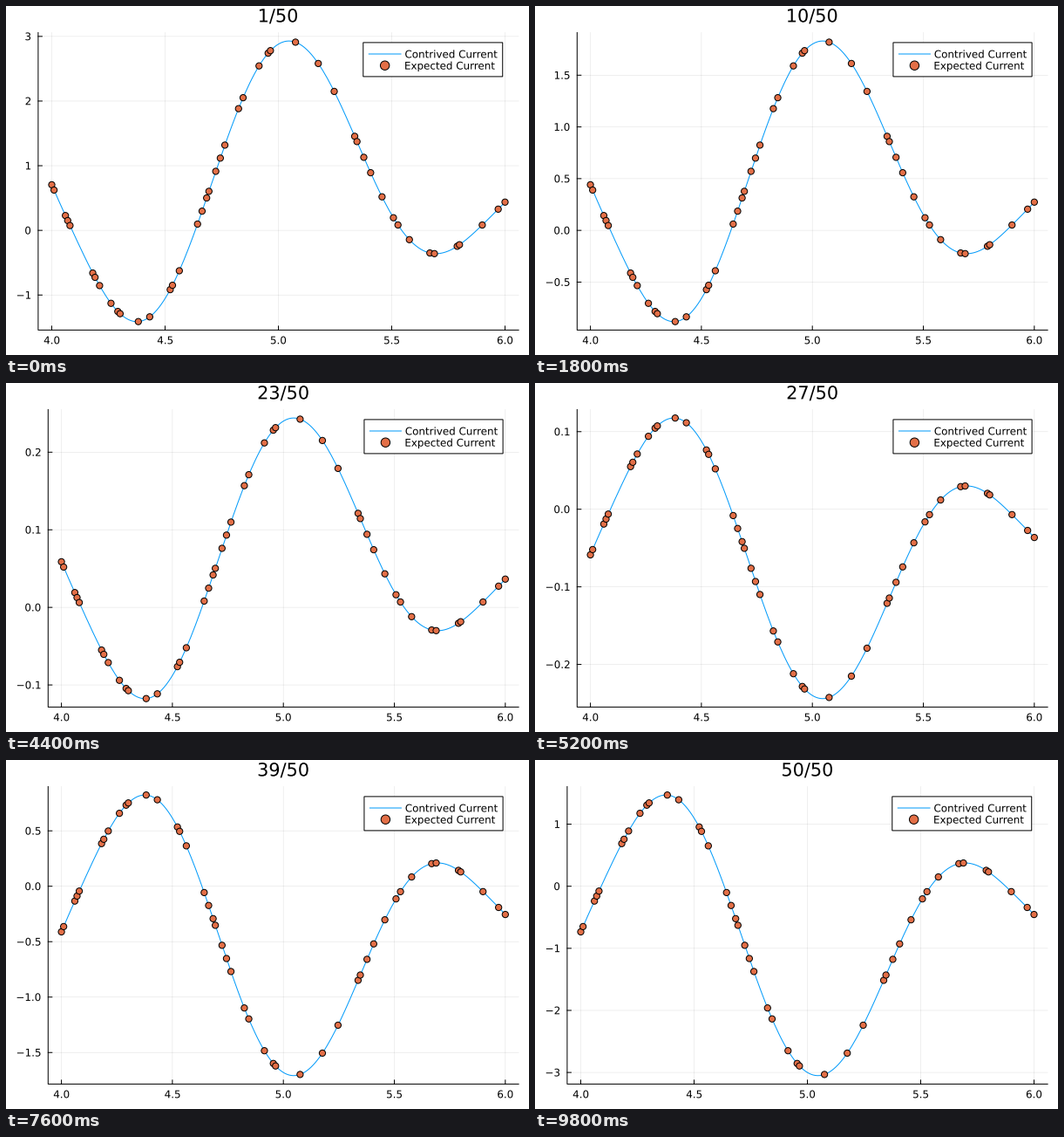
These frames come from a looping animation (600 px wide and 400 px high, 10000 ms). A matplotlib script:

```python
import math

import matplotlib.pyplot as plt
import numpy as np
from matplotlib.animation import FuncAnimation
from matplotlib.patches import Circle, PathPatch, Rectangle
from matplotlib.textpath import TextPath
from matplotlib.transforms import Affine2D

W, H, DPI = 600, 400, 100
FRAMES, INTERVAL = 50, 200
TOP, BOTTOM, RIGHT = 30.45, 371.4, 588.1
LEFT_BY_DECIMALS = (36.9, 48.3, 55.9)
SMALL, LARGE = 11.9, 20.8
BLUE, ORANGE = "#009afa", "#e36f47"
LINE = 1.0

plt.rcParams["font.family"] = "DejaVu Sans"
plt.rcParams["path.snap"] = False

# The curve is the polynomial through these heights at Chebyshev nodes
HEIGHTS = [52.3, 23.5, -53.9, -102.4, 42.9, 213.6, 124.3, -13.3, -14.6,
           19.4, 32.4]
PEAK = 0.12204
nodes = -np.cos(np.linspace(0, np.pi, len(HEIGHTS)))
grid = np.linspace(-1, 1, 200)
xs = 5 + grid
shape = np.polyval(np.polyfit(nodes, HEIGHTS, len(HEIGHTS) - 1), grid)
shape *= PEAK / shape.max()

# Grid points that carry a marker
PICKS = [0, 1, 6, 7, 8, 18, 19, 21, 26, 29, 30, 38, 43, 52, 53, 56,
         64, 66, 68, 69, 72, 74, 76, 82, 84, 91, 95, 96, 107, 117, 124,
         133, 134, 137, 140, 145, 150, 152, 157, 166, 168, 178, 179,
         189, 196, 199]

fig = plt.figure(figsize=(W / DPI, H / DPI), dpi=DPI, facecolor="white")
ax = fig.add_axes([0, 0, 1, 1])


def pt(px):
    return px * 72 / DPI


def stroke(x, y, width=LINE, color="black", **kw):
    ax.plot(x, y, color=color, lw=pt(width), **kw)


def dot(x, y, radius):
    ax.add_patch(Circle((x, y), radius, facecolor=ORANGE, edgecolor="black",
                        lw=pt(LINE), zorder=4))


def label(s, x, base, size=SMALL, align=0.5):
    """Text whose ink box is anchored at x: 0 left, 0.5 centre, 1 right."""
    path = TextPath((0, 0), s, size=size)
    box = path.get_extents()
    shift = x - box.x0 - align * box.width
    path = path.transformed(Affine2D().scale(1, -1).translate(shift, base))
    ax.add_patch(PathPatch(path, facecolor="black", lw=0, zorder=6))


def nice_ticks(lo, hi):
    """Tick values and decimals with the best count, coverage and roundness."""
    span = hi - lo
    top = math.floor(math.log10(span))
    best = (-1, None, 0)
    for e in (top, top - 1):
        for q, nice in ((1, 1), (5, 0.9), (2, 0.7), (2.5, 0.5), (3, 0.2)):
            step = q * 10.0 ** e
            first = math.ceil(lo / step - 1e-9)
            last = math.floor(hi / step + 1e-9)
            n = last - first + 1
            if not 4 <= n <= 8:
                continue
            score = ((1 - abs(n - 5) / 5) / 4 + nice / 4
                     + 0.5 * span / ((n - 1) * step))
            if score > best[0]:
                values = [k * step for k in range(first, last + 1)]
                best = (score, values, max(0, -e) + (q == 2.5))
    return best[1], best[2]


def limits(y):
    lo, hi = y.min(), y.max()
    if hi == lo:
        return lo - 1, hi + 1
    pad = 0.03 * (hi - lo)
    return lo - pad, hi + pad


def draw_legend(width):
    right = RIGHT - width / 30
    end = right - 116.7
    start = end - width / 15
    left, top = start - 6.5, 41.9
    ax.add_patch(Rectangle((left, top), right - left, 39, facecolor="white",
                           edgecolor="black", lw=pt(LINE), zorder=3))
    stroke([start, end], [55, 55], color=BLUE, zorder=4)
    dot((start + end) / 2, 68.2, 5.2)
    label("Contrived Current", right - 111.6, 59.4, align=0)
    label("Expected Current", right - 111.6, 72.6, align=0)


def draw(i):
    ax.clear()
    ax.set(xlim=(0, W), ylim=(H, 0))
    ax.axis("off")

    y = (FRAMES // 2 - 1 - i) * shape
    lo, hi = limits(y)
    values, decimals = nice_ticks(lo, hi)
    left = LEFT_BY_DECIMALS[min(decimals, 2)]
    width = RIGHT - left

    def px(x):
        return left + (x - 3.94) / 2.12 * width

    def py(v):
        return BOTTOM - (v - lo) / (hi - lo) * (BOTTOM - TOP)

    for x in np.arange(4, 6.1, 0.5):
        c = px(x)
        stroke([c, c], [TOP, BOTTOM], 0.625, alpha=0.1)
        stroke([c, c], [BOTTOM, BOTTOM - 4.5])
        label(f"{x:.1f}", c, 387.3)
    for v in values:
        c = py(v)
        stroke([left, RIGHT], [c, c], 0.625, alpha=0.1)
        stroke([left, left + 4.5], [c, c])
        sign = "\u2212" if v < 0 else ""
        label(f"{sign}{abs(v):.{decimals}f}", left - 8.8, c + 4.35, align=1)
    stroke([left, left, RIGHT], [TOP, BOTTOM, BOTTOM])

    stroke(px(xs), py(y), color=BLUE)
    for k in PICKS:
        dot(px(xs[k]), py(y[k]), 3.6)
    draw_legend(width)
    label(f"{i + 1}/{FRAMES}", (left + RIGHT) / 2, 18.4, LARGE)
    return ax.get_children()


anim = FuncAnimation(fig, draw, frames=FRAMES, interval=INTERVAL,
                     init_func=lambda: draw(0), repeat=True, repeat_delay=0)
plt.show()
```
